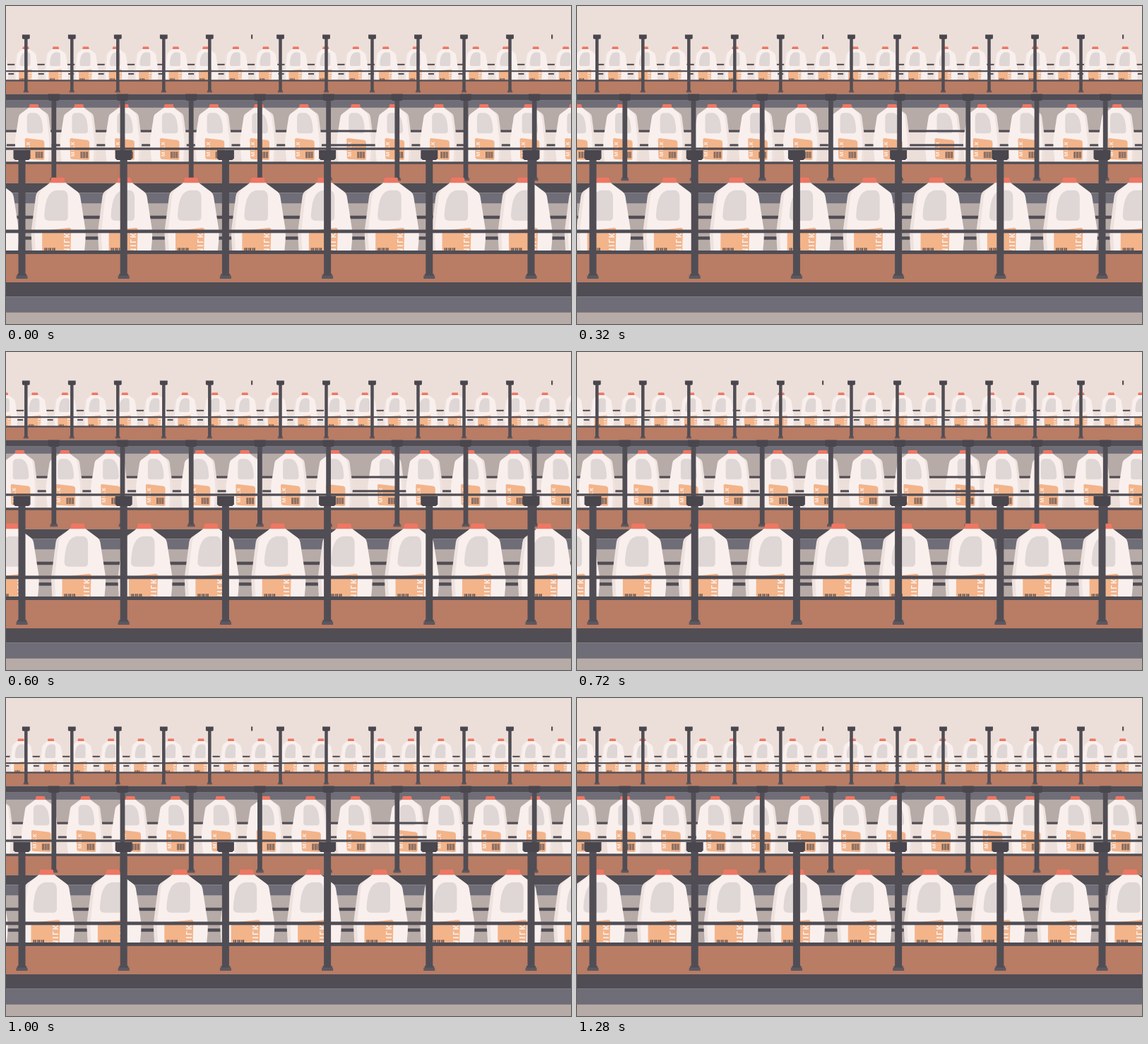
Write an HTML page with a canvas that moves like this. It is 800x450 px and loops after 1320 ms.

```html
<!DOCTYPE html>
<html lang="en">
<head>
<meta charset="utf-8">
<title>Milk conveyor</title>
<style>
  html, body { margin: 0; width: 100%; height: 100%; overflow: hidden; background: #ecdfd9; }
  canvas { display: block; }
</style>
</head>
<body>
<canvas id="stage" width="800" height="450"></canvas>
<script>
const ctx = document.getElementById('stage').getContext('2d');
const LOOP = 1320, STEP = 40;
const WIDTH = 800, PITCH = 94.4;
const color = {
  wall: '#ecdfd9', floor: '#b7aba8', slate: '#6f6d77', dark: '#504d54', knob: '#49464d',
  foot: '#5b5960', board: '#b97c65', milk: '#f9f0ee', side: '#eee2df', handle: '#dfd7d5',
  cap: '#ee7763', label: '#f3b48a', code: '#75605a'
};

const series = (start, gap, count) => Array.from({ length: count }, (_, i) => start + gap * i);

// Sizes inside a belt are in front-belt pixels, multiplied by its scale.
// Speed is in stage pixels per tick; a stray bottle takes the place of one in the line.
const belts = [
  { scale: 0.45, rail: 105.5, top: 57.5, floorEnd: 179, start: 28, speed: -1.645,
    posts: [...series(28.3, 65, 5), ...series(388.5, 65, 6)] },
  { scale: 0.675, rail: 222, top: 139, floorEnd: 348, start: 39.5, speed: 2.43,
    stray: { slot: 7, x: 495 }, posts: series(67.8, 97.2, 8) },
  { scale: 1, rail: 348.5, top: 242.7, floorEnd: 450, start: 73.2, speed: -3.67,
    posts: series(22.5, 144.2, 6) }
];

function rect(fill, x, y, w, h) {
  ctx.fillStyle = fill;
  ctx.fillRect(x, y, w, h);
}

function shape(fill, path) {
  ctx.fillStyle = fill;
  ctx.fill(path);
}

const sidePath = new Path2D('M10 7 L27 19 Q30 21 31 26 L37 72 Q38 80 37 90 L35 123 H15 Z');
const bodyPath = new Path2D('M-10.5 7 H10.5 L22 17 Q26 20 27 27 L32 72 Q33 80 32 92 L30 123 H-36 L-39 92 Q-40 80 -39 72 L-32 27 Q-31 22 -28 20 Z');
const handlePath = new Path2D('M-8 18 H2 Q9 19 13 26 Q18 34 19 54 Q19 61 13 61 H-10 Q-14 61 -14.5 56 V27 Q-14 19 -8 18 Z');
const labelPath = new Path2D('M-16 71 L18 75 Q22 76 22 80 V113 Q22 117 18 117 L-14 115 Q-18 115 -18 111 L-19 74 Q-19 71 -16 71 Z');
const capPath = new Path2D('M-8 0 H8 Q9 0 9.3 1 L10.5 7.5 H-10.5 L-9.3 1 Q-9 0 -8 0 Z');
const knobPath = new Path2D('M-12 -144.5 H12 V-133 L9.5 -130.5 H-9.5 L-12 -133 Z');

function bottle(x, { top, scale, speed }) {
  ctx.save();
  ctx.translate(x, top);
  ctx.scale(scale * Math.sign(speed), scale);
  shape(color.side, sidePath);
  shape(color.milk, bodyPath);
  shape(color.handle, handlePath);
  shape(color.label, labelPath);
  shape(color.cap, capPath);
  for (let i = 0; i < 6; i++) rect(color.code, 3.5 + i * 2.8, 99.5, i % 2 ? 1.6 : 2.3, 13.5);
  ctx.translate(-11.5, 110);
  ctx.rotate(-Math.PI / 2);
  ctx.fillStyle = color.milk;
  ctx.fillText('MILK', 0, 0);
  ctx.restore();
}

function post(x, { rail, scale }) {
  ctx.save();
  ctx.translate(x, rail);
  ctx.scale(scale, scale);
  rect(color.dark, -5, -140, 10, 176);
  shape(color.knob, knobPath);
  rect(color.dark, -6.5, 30.5, 13, 3);
  rect(color.foot, -8, 33, 16, 4.5);
  ctx.restore();
}

function drawBelt(belt, tick) {
  const { scale, rail, top, floorEnd, start, speed, stray, posts } = belt;
  const bar = (fill, from, to, base = rail) =>
    rect(fill, 0, base + from * scale, WIDTH, (to - from) * scale);
  const shift = speed * tick;

  // The stray bottle stands behind the rear rails.
  if (stray) bottle(stray.x + shift, belt);
  bar(color.dark, 54, 58.5, top);
  bar(color.dark, 83.5, 88, top);

  for (let slot = -3; slot < 23; slot++) {
    if (slot !== stray?.slot) bottle(start + shift + slot * PITCH * scale, belt);
  }

  bar(color.board, 0, 42.5);
  bar(color.dark, 42.5, 62.7);
  bar(color.slate, 62.7, 85.4);
  const floorTop = rail + 85.4 * scale;
  rect(color.floor, 0, floorTop, WIDTH, floorEnd - floorTop);
  bar(color.dark, -32, -27.2);
  bar(color.dark, -2.5, 2.5);
  posts.forEach(x => post(x, belt));
}

function draw(now) {
  // Motion runs at 30 steps a second, shown at 25.
  const tick = Math.round(Math.floor((now % LOOP) / STEP) * 1.2);
  rect(color.wall, 0, 0, WIDTH, 450);
  rect(color.dark, 347, 40.5, 2.2, 6);
  rect(color.dark, 772, 40.5, 2.2, 6);
  belts.forEach(belt => drawBelt(belt, tick));
}

ctx.font = 'bold 11px "Open Sans", Arial, sans-serif';
ctx.letterSpacing = '1.3px';
ctx.textBaseline = 'middle';

const begin = performance.now();
function loop() {
  draw(performance.now() - begin);
  requestAnimationFrame(loop);
}
loop();
</script>
</body>
</html>
```
